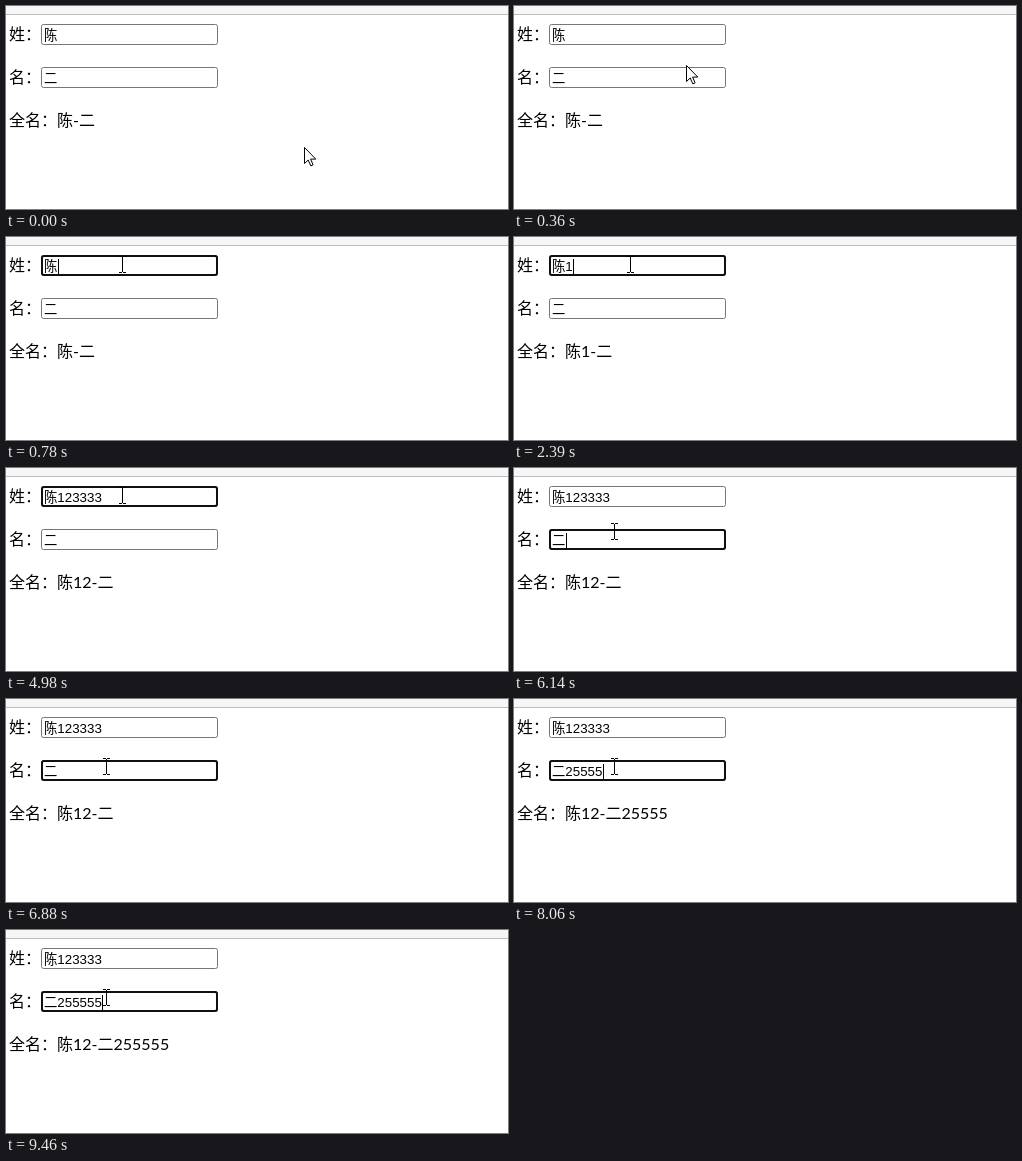
Animation, 502 px wide and 203 px high, one loop 9.94 s. Source, as an HTML page:

```html
<!DOCTYPE html>
<html lang="zh-CN">
<head>
<meta charset="utf-8">
<style>
  html, body { margin: 0; width: 100%; height: 100%; overflow: hidden; background: #fff; }
  svg { display: block; }
  text { font: 16px Lato, "Noto Sans CJK SC", sans-serif; white-space: pre; }
  .value { font: 13.333px "Liberation Sans", "Noto Sans CJK SC", sans-serif; }
  .box { fill: #fff; stroke: #767676; }
  .ring { fill: none; stroke: #101010; stroke-width: 2; }
</style>
</head>
<body>
<svg width="502" height="203" viewBox="0 0 502 203">
  <rect width="502" height="8" fill="#f6f6f6"/>
  <rect y="8" width="502" height="1" fill="#bdbdbd"/>
  <text x="3" y="34">姓：</text>
  <text x="3" y="77">名：</text>
  <text x="3" y="120" id="full"></text>
  <rect class="box" x="35.5" y="18.5" width="176" height="20" rx="2"/>
  <rect class="box" x="35.5" y="61.5" width="176" height="20" rx="2"/>
  <rect class="ring" id="ring" x="36" width="175" height="19" rx="2"/>
  <text class="value" x="38" y="34" id="last"></text>
  <text class="value" x="38" y="77" id="first"></text>
  <rect id="caret" width="1" height="15"/>
  <path id="arrow" d="M.5 .5V16.5L4.2 13 6.8 18.9 9.1 17.9 6.6 12.1H11.8Z" fill="#fff" stroke="#000"/>
  <path id="beam" d="M-3.5-8h3m1 0h3M0-7.5V7.5M-3.5 8h3m1 0h3" fill="none" stroke="#000"/>
</svg>
<script>
const LOOP = 9940;
const $ = id => document.getElementById(id);

const lastName = { base: '陈', digits: '123333', keys: [2390, 3030, 3450, 3790, 4060, 4410], top: 18, focus: 620 };
const firstName = { base: '二', digits: '255555', keys: [7170, 7410, 7610, 7820, 8060, 8400], top: 61, focus: 6140 };

const caretOff = [[1240, 1760], [2280, 2390], [2920, 3030], [4980, 5500], [6020, 6140], [6880, 7170], [8940, 9460]];

// Mouse waypoints: time, x, y
const route = [
  [20, 298, 141], [560, 116, 23], [640, 116, 23], [780, 116, 27],
  [5300, 116, 27], [5830, 86, 52], [6150, 100, 63], [6340, 100, 63], [6410, 100, 67]
];

function mouseAt(t) {
  const next = route.findIndex(p => p[0] > t);
  if (next < 1) return (next ? route[route.length - 1] : route[0]).slice(1);
  const [t0, x0, y0] = route[next - 1], [t1, x1, y1] = route[next];
  const u = (t - t0) / (t1 - t0), e = u * u * (3 - 2 * u);
  return [Math.round(x0 + (x1 - x0) * e), Math.round(y0 + (y1 - y0) * e)];
}

const typed = (field, t) => field.digits.slice(0, field.keys.filter(k => k <= t).length);
const show = (el, on) => el.setAttribute('visibility', on ? 'visible' : 'hidden');

function draw(t) {
  const a = typed(lastName, t), b = typed(firstName, t);
  $('last').textContent = lastName.base + a;
  $('first').textContent = firstName.base + b;
  // The full name stops following the surname after two digits
  $('full').textContent = `全名：${lastName.base}${a.slice(0, 2)}-${firstName.base}${b}`;

  const active = t >= firstName.focus ? firstName : lastName;
  const focused = t >= active.focus;
  show($('ring'), focused);
  $('ring').setAttribute('y', active.top + 1);
  show($('caret'), focused && !caretOff.some(([from, to]) => t >= from && t < to));
  $('caret').setAttribute('x', Math.floor(52.3 + 7.415 * typed(active, t).length));
  $('caret').setAttribute('y', active.top + 4);

  const [x, y] = mouseAt(t);
  const overField = x >= 35 && x < 212 && [lastName, firstName].some(f => y >= f.top && y < f.top + 21);
  show($('arrow'), !overField);
  show($('beam'), overField);
  $('arrow').setAttribute('transform', `translate(${x} ${y})`);
  $('beam').setAttribute('transform', `translate(${x + .5} ${y + .5})`);
}

const start = performance.now();
function tick() {
  draw((performance.now() - start) % LOOP);
  requestAnimationFrame(tick);
}
tick();
</script>
</body>
</html>
```
